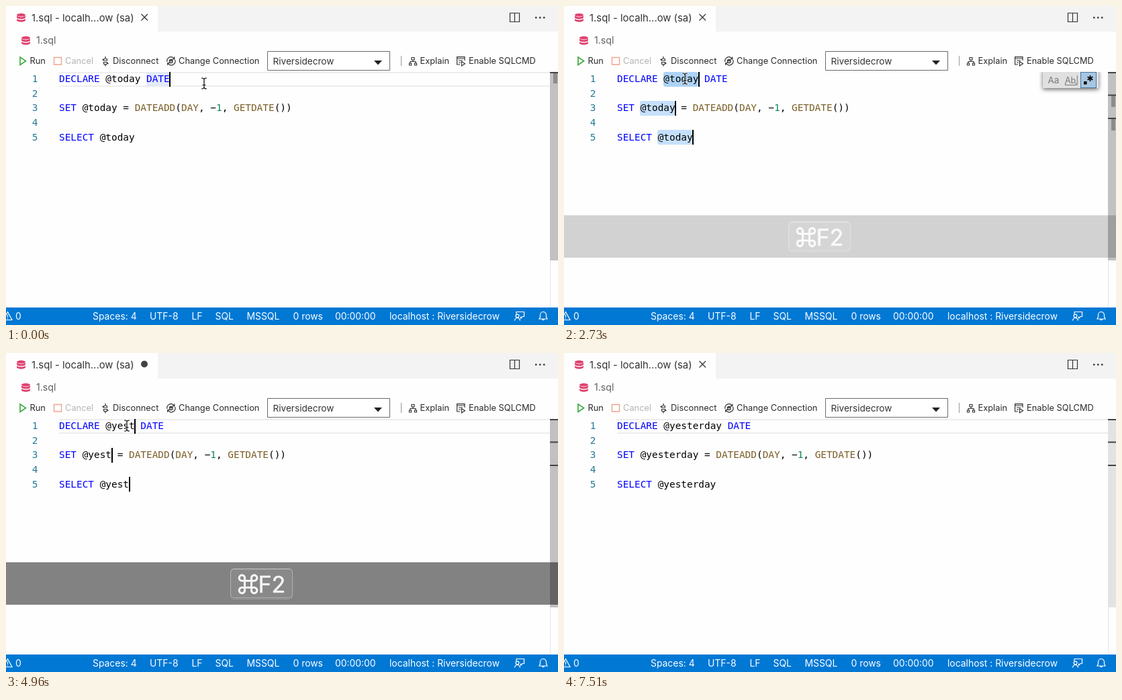
An HTML page for the animation above (7.61 s loop, 822 by 474 pixels).

```html
<!DOCTYPE html>
<html lang="en">
<head>
<meta charset="utf-8">
<title>Renaming a SQL variable</title>
<style>
html, body { margin: 0; width: 100%; height: 100%; overflow: hidden; background: #fefefe; }
svg { display: block; }
text { font-family: Inter, "Liberation Sans", sans-serif; white-space: pre; }
.code text { font: 14.4px "DejaVu Sans Mono", monospace; }
.num { fill: #237893; }
.kw { fill: #00f; }
.fn { fill: #795e26; }
.lit { fill: #098658; }
.bar { font-size: 12.85px; fill: #2b2b2b; }
.status { font-size: 13.9px; fill: #fff; }
.line { fill: none; stroke: #333; stroke-width: 1.2; }
</style>
</head>
<body>
<svg width="822" height="474" viewBox="0 0 822 474">
  <defs>
    <g id="db" fill="#e0406f">
      <ellipse cx="6.5" cy="2.3" rx="6.5" ry="2.3"/>
      <path id="disk" d="M0 3.8Q6.5 7 13 3.8V6.2Q11.5 8.3 6.5 8.3T0 6.2Z"/>
      <use href="#disk" y="4.4"/>
    </g>
    <path id="beam" d="M-3.5-8Q0-8 0-5.5Q0-8 3.5-8M0-5.5V5.5M-3.5 8Q0 8 0 5.5Q0 8 3.5 8M-2 2.5H2"/>
    <filter id="shadow" x="-20%" y="-20%" width="140%" height="170%">
      <feDropShadow dx="0" dy="2" stdDeviation="3" flood-opacity=".6"/>
    </filter>
    <clipPath id="belowBar"><rect y="98" width="822" height="40"/></clipPath>
  </defs>

  <!-- tab bar -->
  <path d="M226 0H822V38H226Z" fill="#f3f3f3"/>
  <use href="#db" x="16" y="11"/>
  <text x="38" y="23" font-size="14.85" fill="#333">1.sql - localh...ow (sa)</text>
  <path id="close" class="line" d="M201.500 12L211 21.500M211 12L201.500 21.500"/>
  <circle id="dirty" cx="206" cy="16.500" r="5" fill="#424242"/>
  <path class="line" d="M750.500 10.500H764.500V23.500H750.500ZM757.500 10V24"/>
  <path d="M788 16h2.500v2.500h-2.500zM794 16h2.500v2.500h-2.500zM800 16h2.500v2.500h-2.500z" fill="#424242"/>
  <use href="#db" x="23" y="45"/>
  <text x="45" y="56" font-size="14.2" fill="#616161">1.sql</text>

  <!-- toolbar -->
  <path d="M21 76V87.500L29.500 81.700Z" fill="none" stroke="#37a63c" stroke-width="1.6"/>
  <path d="M71.500 76.500H82.500V87H71.500Z" fill="none" stroke="#f0a48e" stroke-width="1.4"/>
  <g class="line">
    <path d="M148 75V78M145.500 81V79.500Q145.500 78 148 78T150.500 79.500V81ZM145.500 83.500H150.500V85Q150.500 87 148 87T145.500 85ZM148 87V89.500M143.500 79L145 80.500M152.500 86L151 84.500"/>
    <path d="M240 83A5.700 5.700 0 0 1 249 77L250.500 78.500M250.800 75.500V79H247.300M251.500 80A5.700 5.700 0 0 1 242.500 86.500L241 85M240.700 88V84.500H244.200"/>
    <path d="M243.500 80.500Q245.800 78.500 248 80.500V83.500Q245.800 85.500 243.500 83.500ZM243.500 80.500Q245.800 82.500 248 80.500"/>
    <path d="M604 76.500H608V80H604ZM606 80V82.500M602 85V82.500H610V85M600.500 85H603.500V88H600.500ZM608.500 85H611.500V88H608.500Z"/>
    <path d="M676 87H671.600V75.600H683V81M671.600 78H683M674 81H680M674 84H677M678.500 82.500V89L683.500 85.700Z"/>
  </g>
  <g class="bar">
    <text x="35.500" y="86">Run</text>
    <text x="88" y="86" fill="#b4b4b4">Cancel</text>
    <text x="159" y="86">Disconnect</text>
    <text x="257" y="86">Change Connection</text>
    <text x="616.500" y="86">Explain</text>
    <text x="689" y="86">Enable SQLCMD</text>
  </g>
  <path d="M389.500 67.500H571.500V95.500H389.500Z" fill="#fff" stroke="#6a6a6a"/>
  <path d="M548 81H560L554 87.500Z" fill="#222"/>
  <text x="397.500" y="87" font-size="13.6" fill="#333">Riversidecrow</text>
  <path d="M588.500 74V89" stroke="#999"/>

  <!-- editor -->
  <path id="current" d="M79 99H822M79 119H822" stroke="#ededed" stroke-width="2"/>
  <g id="marks"></g>
  <g class="code" id="code"></g>

  <!-- scroll bar -->
  <path d="M810.500 98V448" stroke="#e6e6e6"/>
  <rect id="slider" x="810" y="98" width="12" height="280"/>
  <g id="ruler"></g>

  <g id="find" clip-path="url(#belowBar)">
    <rect x="713" y="94" width="83" height="28" fill="#e0e0e0" filter="url(#shadow)"/>
    <rect x="769.500" y="98.500" width="23" height="23" fill="#a9c6e0" stroke="#3f78aa"/>
    <text x="720.500" y="115" font-size="13.5" fill="#777">Aa</text>
    <text x="746" y="114.500" font-size="12.5" fill="#777">Ab|</text>
    <path d="M746.500 114V117.500H762.500V114" fill="none" stroke="#777"/>
    <path d="M774 112h4.500v4.500h-4.500z"/>
    <path d="M783.500 103V112M779.600 105.300L787.400 109.700M787.400 105.300L779.600 109.700" stroke="#000" stroke-width="1.7"/>
  </g>

  <!-- key display -->
  <g id="keys">
    <rect y="311" width="822" height="63" opacity=".49"/>
    <rect x="334.500" y="321.500" width="92" height="44" rx="5" fill="none" stroke="#a0a0a0"/>
    <rect x="334.500" y="320.500" width="92" height="43" rx="5" fill="#fff" fill-opacity=".06" stroke="#b0b0b0"/>
    <path d="M355.500 338.500H365.500V348.500H355.500ZM355.500 338.500V335A4.200 4.200 0 1 0 351.300 338.500ZM365.500 338.500V335A4.200 4.200 0 1 1 369.700 338.500ZM355.500 348.500V352A4.200 4.200 0 1 1 351.300 348.500ZM365.500 348.500V352A4.200 4.200 0 1 0 369.700 348.500Z" fill="none" stroke="#f4f4f4" stroke-width="3.1"/>
    <text x="375.500" y="356" font-size="34" fill="#f4f4f4" stroke="#f4f4f4" stroke-width=".6">F2</text>
  </g>

  <!-- status bar -->
  <rect y="448" width="822" height="26" fill="#0078d4"/>
  <g fill="none" stroke="#fff" stroke-width="1.2">
    <path d="M-4 466.500L2.500 454.500L9 466.500ZM2.500 458.500V462.500M2.500 463.700V465"/>
    <path d="M760 458V454.500H771.500V461.500H769L766.500 464V461.500M757.500 467.500Q758 463.500 761.500 463.500T765.500 467.500"/>
    <circle cx="761.500" cy="460.500" r="2.400"/>
    <path d="M794 465H806L804.500 462V459A4.500 4.500 0 0 0 795.500 459V462ZM798.500 465.500A1.600 1.600 0 0 0 801.500 465.500"/>
  </g>
  <g class="status">
    <text x="14" y="466">0</text>
    <text x="129" y="466">Spaces: 4</text>
    <text x="214" y="466">UTF-8</text>
    <text x="276.500" y="466">LF</text>
    <text x="311.500" y="466">SQL</text>
    <text x="358.500" y="466">MSSQL</text>
    <text x="427.500" y="466">0 rows</text>
    <text x="490" y="466">00:00:00</text>
    <text x="571" y="466">localhost : Riversidecrow</text>
  </g>

  <g id="mouse" fill="none" stroke-linecap="round">
    <use href="#beam" stroke="#fff" stroke-width="2.6"/>
    <use href="#beam" stroke="#000" stroke-width="1.2"/>
  </g>
</svg>
<script>
const LOOP = 7610, TICK = 85.7, LEFT = 79, CHAR = 8.669, ROW = 21.72;
const BLINKS = [90, 600, 1390, 1930, 2460, 2730, 3170, 3710, 6650, 7080, 7510];
const TYPED = [3800, 4160, 4520, 4700, 4960, 5230, 5400, 5670, 5930, 6110];
const CLICK = 775, SELECT = 950, MULTI = 2730, EDIT = TYPED[0], SAVE = 6907, LEAVE = 6650;
const VAR_ROWS = [[0, 8], [2, 4], [4, 7]]; // row and column of each variable

const $ = id => document.getElementById(id);
const show = (id, on) => $(id).setAttribute("visibility", on ? "visible" : "hidden");
const passed = (times, t) => times.filter(at => at <= t).length;
const ease = p => p * p * (3 - 2 * p);
const clamp = p => Math.min(1, Math.max(0, p));
const ticks = (t, from) => Math.floor((t - from) / TICK);
const rect = (x, y, w, h, fill, r = 0) =>
  `<rect x="${x}" y="${y}" width="${w}" height="${h}" rx="${r}" fill="${fill}"/>`;
const cell = (row, col, w, fill, r) =>
  rect(Math.floor(LEFT + col * CHAR), Math.floor(98 + row * ROW), w, 22, fill, r);
const mark = (row, chars, fill, col) => cell(row, col, Math.round(chars * CHAR), fill, 3);

const colour = line => line.replace(
  /\b(DECLARE|SET|SELECT|DATE)\b|\b(DATEADD|DAY|GETDATE)\b|\d/g,
  (word, kw, fn) => `<tspan class="${kw ? "kw" : fn ? "fn" : "lit"}">${word}</tspan>`);

function codeText(name) {
  const lines = [`DECLARE ${name} DATE`, "", `SET ${name} = DATEADD(DAY, −1, GETDATE())`, "", `SELECT ${name}`];
  return lines.map((line, i) => {
    const y = 113 + i * ROW;
    return `<text class="num" x="38.7" y="${y}">${i + 1}</text><text x="${LEFT}" y="${y}">${colour(line)}</text>`;
  }).join("");
}

function highlights(t) {
  if (t < CLICK) return mark(0, 4, "#e4ebf8", 15);
  if (t < SELECT || t >= EDIT) return "";
  const other = t < MULTI ? "#d6eaff" : "#c6e0fb";
  return VAR_ROWS.map(([row, col]) => mark(row, 6, row ? other : "#add3f8", col)).join("");
}

function carets(t, length) {
  if (passed(BLINKS, t) % 2) return "";
  const places = t < CLICK ? [[0, 19]] : t < SELECT ? [[0, 12]]
    : VAR_ROWS.slice(0, t < MULTI ? 1 : 3).map(([row, col]) => [row, col + length]);
  return places.map(([row, col]) => cell(row, col, 2, "#000")).join("");
}

function ruler(t) {
  let out = "";
  if (t < CLICK) out += rect(815, 99, 6, 16, "#8c8c8c");
  if (t >= SELECT && t < EDIT) out += rect(815, 133, 6, 17, "#8c8c8c") + rect(815, 168, 6, 17, "#8c8c8c");
  const rows = t < MULTI ? [98] : [98, 131.5, 166];
  return out + rows.map(y => rect(810, y, 12, 2, "#444")).join("");
}

function mouseAt(t) {
  if (t >= LEAVE) return [180, 108 + 380 * ease(clamp(ticks(t, LEAVE) / 7))];
  if (t >= 1040) return [180, 108];
  const p = ease(clamp((ticks(t, 260) + 1) / 8));
  return [295 - 114 * p, 115 - 7 * p];
}

function keyOpacity(t) {
  if (t < MULTI) return 0;
  if (t >= LEAVE) return clamp(1 - ticks(t, LEAVE) / 4);
  return clamp(.35 + .325 * Math.floor((t - MULTI) / 85));
}

function draw(t) {
  const name = t < EDIT ? "@today" : "@yesterday".slice(0, passed(TYPED, t));
  const dirty = t >= EDIT && t < SAVE;
  $("code").innerHTML = codeText(name) + carets(t, name.length);
  $("marks").innerHTML = highlights(t);
  $("ruler").innerHTML = ruler(t);
  $("slider").setAttribute("fill", t < 7510 ? "#c1c1c1" : "#e3e3e3");
  $("keys").setAttribute("opacity", keyOpacity(t));
  $("mouse").setAttribute("transform", `translate(${mouseAt(t)})`);
  show("current", t < SELECT || t >= EDIT);
  show("find", t >= MULTI && t < TYPED[3]);
  show("dirty", dirty);
  show("close", !dirty);
}

const start = performance.now();
function frame() {
  draw((performance.now() - start) % LOOP);
  requestAnimationFrame(frame);
}
frame();
</script>
</body>
</html>
```
